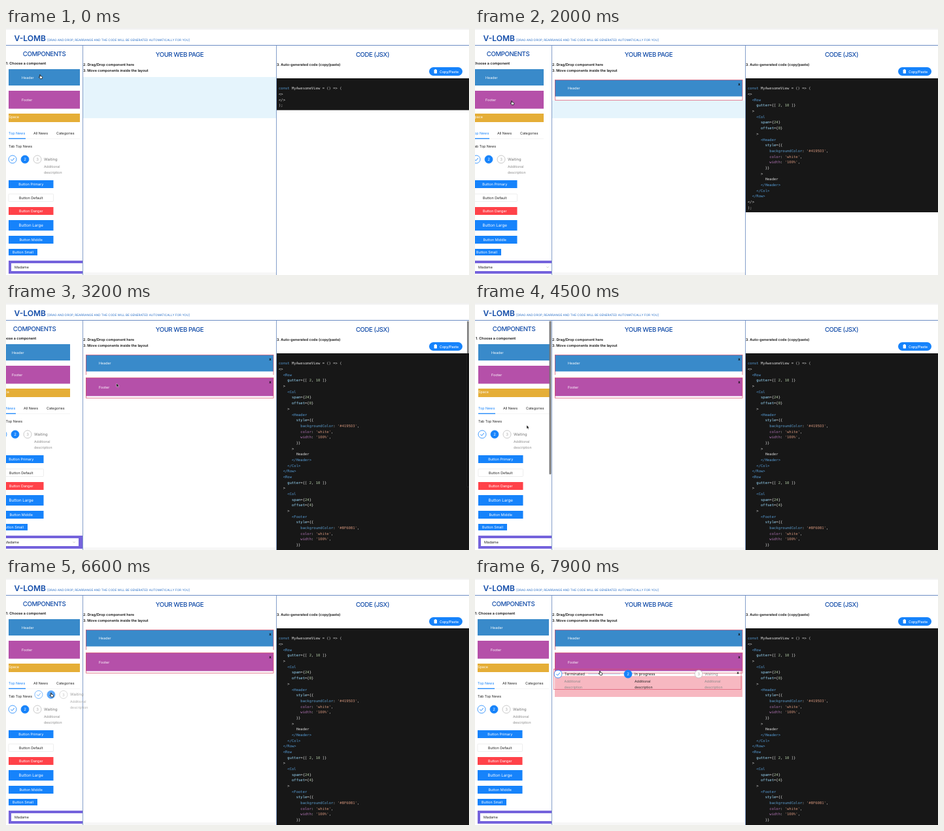
Write an HTML page that moves like this. It is 708 px wide and 378 px high and loops after 8000 ms.

```html
<!DOCTYPE html>
<html lang="en">
<head>
<meta charset="utf-8">
<title>V-LOMB</title>
<style>
html, body { margin: 0; width: 100%; height: 100%; overflow: hidden; background: #fff; }
svg { display: block; width: 708px; height: 378px; }
text { font-family: Inter, "Open Sans", sans-serif; white-space: pre; text-rendering: geometricPrecision; }
.title { font-size: 9.6px; font-weight: 500; letter-spacing: -.4px; fill: #114ba8; text-anchor: middle; }
.note { font-size: 5.45px; font-weight: 600; fill: #111; }
.code { font-family: "DejaVu Sans Mono", monospace; font-size: 5.54px; }
</style>
</head>
<body>
<svg id="stage" viewBox="0 0 708 378"></svg>
<script>
const BLUE = '#1683fb', HEAD = '#398aca', FOOT = '#b550a9', RED = '#d9506c', GRAY = '#888';
const stage = document.getElementById('stage');

const text = (x, y, s, fill = '#222', size = 5.35, extra = '') =>
  `<text x="${x}" y="${y}" fill="${fill}" font-size="${size}" ${extra}>${s}</text>`;
const rect = (x, y, w, h, fill, extra = '') =>
  `<rect x="${x}" y="${y}" width="${w}" height="${h}" fill="${fill}" ${extra}/>`;
const group = (id, body, extra = '') => `<g id="${id}" ${extra}>${body}</g>`;
const frame = (x, y) => rect(x + .5, y + .5, 286.5, 31, 'none', `stroke="${RED}" stroke-width=".7"`);
const close = (x, y) => text(x, y, 'x', '#111', 6, 'font-weight="700"');
const block = (y, h, fill, label) => rect(4, y, 109, h, fill) + text(24, y + h / 2 + 2, label, '#fff');

function button(y, h, label, fill = BLUE, w = 68.5, size = 5.4) {
  const plain = fill === '#fff';
  return rect(4, y, w, h, fill, plain ? 'stroke="#e2e2e2" stroke-width=".6" rx="1"' : '') +
    text(4 + w / 2, y + h / 2 + 2, label, plain ? '#222' : '#fff', size, 'text-anchor="middle"');
}

// Step marker: 1 done, 2 active, 3 waiting
function marker(x, y, n) {
  const fill = n === 2 ? BLUE : '#fff', line = n === 3 ? '#bbb' : BLUE;
  return `<circle cx="${x}" cy="${y}" r="6" fill="${fill}" stroke="${line}" stroke-width=".8"/>` +
    (n === 1
      ? `<path d="M${x - 2.6} ${y}l2 2.1 3.4-4.2" fill="none" stroke="${BLUE}" stroke-width=".9"/>`
      : text(x, y + 2.1, n, n === 2 ? '#fff' : '#aaa', 6, 'text-anchor="middle"'));
}
const caption = (x, y, title, ink, sub) =>
  text(x, y, title, ink, 5.9) + text(x, y + 11, 'Additional', sub, 5.2) + text(x, y + 19.6, 'description', sub, 5.2);
const miniSteps = () => [10, 29, 48].map((x, i) => marker(x, 201, i + 1)).join('') +
  caption(58, 203, 'Waiting', '#777', GRAY);

// Rows are opaque, so the drop zone shows only where no row lies
function pageRow(id, y, h, fill, label) {
  return group(id, rect(118, y - 4, 295, 36, '#fff') + rect(122, y + .5, 287, h, fill) +
    text(142, y + h * .61, label, '#fff') + frame(122, y) + close(402.3, y + 8.5));
}
const stepsRow = () => frame(0, 0) + rect(53, 7.6, 49, .8, '#9fc4f2') + rect(161, 7.6, 49, .8, '#eee') +
  [7, 114, 222].map((x, i) => marker(x, 8, i + 1)).join('') +
  caption(16.6, 10.2, 'Terminated', '#222', GRAY) +
  caption(124, 10.2, 'In progress', '#111', '#222') +
  caption(231, 10.2, 'Waiting', '#888', GRAY) + close(280.3, 8.3);

// Generated code
const rowCode = (name, color, offset) => `  <Row
    gutter={[ 2, 10 ]}
  >
    <Col
      span={24}
      offset={${offset}}
    >
      <${name}
        style={{
          backgroundColor: '${color}',
          color: 'white',
          width: '100%',
        }}
      >
        ${name}
      </${name}>
    </Col>
  </Row>
`;
function tint(token) {
  if (/^'/.test(token)) return '#ce9178';
  if (/^(const|<.*\w.*)$/.test(token)) return '#569cd6';
  if (/^(gutter|span|offset|style)$/.test(token)) return '#9cdcfe';
  if (token === 'backgroundColor') return '#5d9fd0';
  if (/^(color|width)$/.test(token)) return '#b174b4';
  if (/^\d+$/.test(token)) return '#b5cea8';
  return '#d8d8d8';
}
function codeView(id, rows, height) {
  const lines = `const MyAwesomeView = () => (\n<>\n${rows}</>\n);`.split('\n');
  return group(id, rect(414, 77, 294, height, '#171717') + lines.map((line, i) => {
    const body = line.trim(), x = 417 + (line.length - body.length) * 3.335;
    const spans = body.match(/'[^']*'|<\/?\w*>?|\w+|[^\w<']+/g)
      .map(s => `<tspan fill="${tint(s)}">${s.replace(/</g, '&lt;')}</tspan>`).join('');
    return `<text class="code" x="${x}" y="${94.4 + i * 8.68}">${spans}</text>`;
  }).join(''));
}
const headerCode = rowCode('Header', '#4195D3', 0);
const footerCode = rowCode('Footer', '#BF60B1', 4);

const palette =
  '<text class="title" x="58.5" y="43.2">COMPONENTS</text>' +
  '<text class="note" x="0" y="56.4">1. Choose a component</text>' +
  block(63, 25, HEAD, 'Header') + block(96, 27.5, FOOT, 'Footer') +
  rect(4, 131, 109, 13, '#e5ae37') + text(4, 138, 'Space', '#fff') +
  text(4, 163.2, 'Top News', BLUE) + text(42, 163.2, 'All News') + text(77, 163.2, 'Categories') +
  rect(4, 169.3, 109, .6, '#eee') + rect(4, 168.6, 26, 1.3, BLUE) +
  text(4, 183, 'Tab Top News') + miniSteps() +
  button(233, 12, 'Button Primary') + button(254, 11.5, 'Button Default', '#fff') +
  button(274, 12, 'Button Danger', '#ff4249') + button(294, 16, 'Button Large', BLUE, 68.5, 6.2) +
  button(318, 12, 'Button Middle') + button(338, 10, 'Button Small', BLUE, 44) +
  rect(4, 356, 129, 20, '#7563dc') + rect(8, 360, 118, 12, '#fff') + text(13, 368.2, 'Madame') +
  '<path d="M117.5 365.2l1.6 1.6 1.6-1.6" fill="none" stroke="#aaa" stroke-width=".6"/>';

stage.innerHTML =
  '<clipPath id="side"><path d="M0 27H117V378H0z"/></clipPath>' +
  rect(0, 0, 708, 378, '#fff') + rect(0, 0, 708, 2.5, '#f1f1f1') +
  text(12.6, 19.6, 'V-LOMB', '#114ba8', 12, 'font-weight="600"') +
  text(63, 20, '[DRAG AND DROP, REARRANGE AND THE CODE WILL BE GENERATED AUTOMATICALLY FOR YOU]', '#2a70c8', 4.63) +
  `<g clip-path="url(#side)">${group('list', palette)}</g>` +
  rect(118, 374, 295, 4, '#f7f7f7') +
  '<text class="title" x="265.5" y="44">YOUR WEB PAGE</text>' +
  '<text class="title" x="560.5" y="44">CODE (JSX)</text>' +
  '<text class="note" x="118" y="58">2. Drag/Drop component here</text>' +
  '<text class="note" x="118" y="66.6">3. Move components inside the layout</text>' +
  '<text class="note" x="414" y="58">3. Auto-generated code (copy/paste)</text>' +
  rect(647, 60, 51, 13, BLUE, 'rx="6.5"') + rect(654.6, 64, 4.4, 5.4, '#fff', 'rx=".6"') +
  rect(655.6, 63.2, 2.4, 1.5, '#fff') + text(663, 68.5, 'Copy/Paste', '#fff', 5.3, 'font-weight="500"') +
  rect(118, 75, 295, 63, '#e5f4fc') +
  pageRow('header', 79, 25.2, HEAD, 'Header') +
  pageRow('footer', 114, 28, FOOT, 'Footer') +
  group('slot', rect(122, 0, 287, 32, '#f7b8c1')) + group('steps', stepsRow()) +
  codeView('code0', '', 48.7) + codeView('code1', headerCode, 205) +
  codeView('code2', headerCode + footerCode, 301) +
  rect(0, 26, 708, .9, '#5b7fbd') + rect(117, 27, .9, 351, '#7795c5') + rect(413, 27, .9, 351, '#7795c5') +
  group('leftBar', rect(113.6, 27.5, 2.8, 235, '#777', 'rx="1.4"')) +
  '<rect id="rightBar" x="705" y="27.5" width="2.8" rx="1.4" opacity=".5" stroke="#fff" stroke-opacity=".3" stroke-width=".5"/>' +
  group('dragHeader', block(63, 25, HEAD, 'Header'), 'opacity=".7"') +
  group('dragFooter', block(96, 27.5, FOOT, 'Footer'), 'opacity=".7"') +
  group('dragSteps', miniSteps(), 'opacity=".7"') +
  group('hand', '<path d="M-1.6 0V-2.4q.6-.8 1.2 0V-.4l2.4.5q.8.3.7 1.2L2.2 3.6H-.8L-2.8 1.2q-.1-.8 1.2.2z" fill="#fff" stroke="#111" stroke-width=".8"/>') +
  group('arrow', '<path d="M0 0V5.4L1.3 4.3 2.2 6.3 3.2 5.8 2.3 3.9H4z" fill="#111" stroke="#fff" stroke-width=".4"/>');

const el = id => document.getElementById(id);
const show = (id, on) => { el(id).style.display = on ? '' : 'none'; };
const move = (id, x, y = 0) => el(id).setAttribute('transform', `translate(${x} ${y})`);

// Eased interpolation through [time, ...values]
function track(keys, t) {
  const i = keys.findIndex(k => k[0] > t);
  if (i < 0) return keys[keys.length - 1].slice(1);
  const a = keys[i - 1], b = keys[i], p = (t - a[0]) / (b[0] - a[0]), e = p * p * (3 - 2 * p);
  return a.slice(1).map((v, j) => v + (b[j + 1] - v) * e);
}

// Moments at which each component is dropped on the page
const HEADER_DROP = 1100, FOOTER_DROP = 2900, STEPS_DROP = 7100, REGRAB = 7600;
const pointer = [
  [0, 53, 74], [200, 53, 74], [900, 170, 100], [1200, 170, 100], [1900, 57, 114], [2100, 57, 114],
  [2800, 169, 123], [3300, 169, 123], [4400, 79, 187], [4700, 79, 187], [5600, 167, 123], [5900, 167, 123],
  [6300, 30, 201], [6400, 30, 201], [7000, 184, 114], [7200, 184, 114], [REGRAB, 194, 156], [7900, 192, 145]
];
const scroll = [[0, 0], [1200, 0], [1900, -8], [2400, -8], [3100, -15], [3600, -15], [4300, 1], [4700, 1], [5300, 0]];
const footerShift = [[0, 0], [6700, 0], [6900, 36], [STEPS_DROP, 36], [STEPS_DROP + 200, 0]];

function draw(now) {
  const t = Math.floor(now % 8000 / 100) * 100;
  const within = (a, b) => t >= a && t < b;
  const [x, y] = track(pointer, t);
  move('list', track(scroll, t)[0]);

  show('header', t >= HEADER_DROP);
  show('footer', t >= FOOTER_DROP);
  move('footer', 0, track(footerShift, t)[0]);
  show('code0', t < HEADER_DROP);
  show('code1', within(HEADER_DROP, FOOTER_DROP));
  show('code2', t >= FOOTER_DROP);
  show('leftBar', within(3700, 6500));
  show('rightBar', within(FOOTER_DROP, 3800) || within(STEPS_DROP, 7800));
  el('rightBar').setAttribute('height', t < STEPS_DROP ? 254 : 190);

  const grabbed = t > REGRAB, preview = within(6900, STEPS_DROP);
  show('slot', grabbed || preview);
  move('slot', 0, preview ? 114 : 150);
  show('steps', t >= 6900);
  if (grabbed) move('steps', x - 72, y - 6);
  else move('steps', 122, preview ? 114 : 150);

  for (const [id, from, to, gx, gy] of [
    ['dragHeader', 300, HEADER_DROP, 53, 74], ['dragFooter', 2200, FOOTER_DROP, 65, 114],
    ['dragSteps', 6500, STEPS_DROP, 30, 201]
  ]) {
    show(id, within(from, to));
    move(id, x - gx, y - gy);
  }

  const arrow = within(FOOTER_DROP, 5000) || within(STEPS_DROP, 7500);
  show('arrow', arrow);
  show('hand', !arrow);
  move(arrow ? 'arrow' : 'hand', x, y);
}

const start = performance.now();
function tick() {
  draw(performance.now() - start);
  requestAnimationFrame(tick);
}
tick();
</script>
</body>
</html>
```
